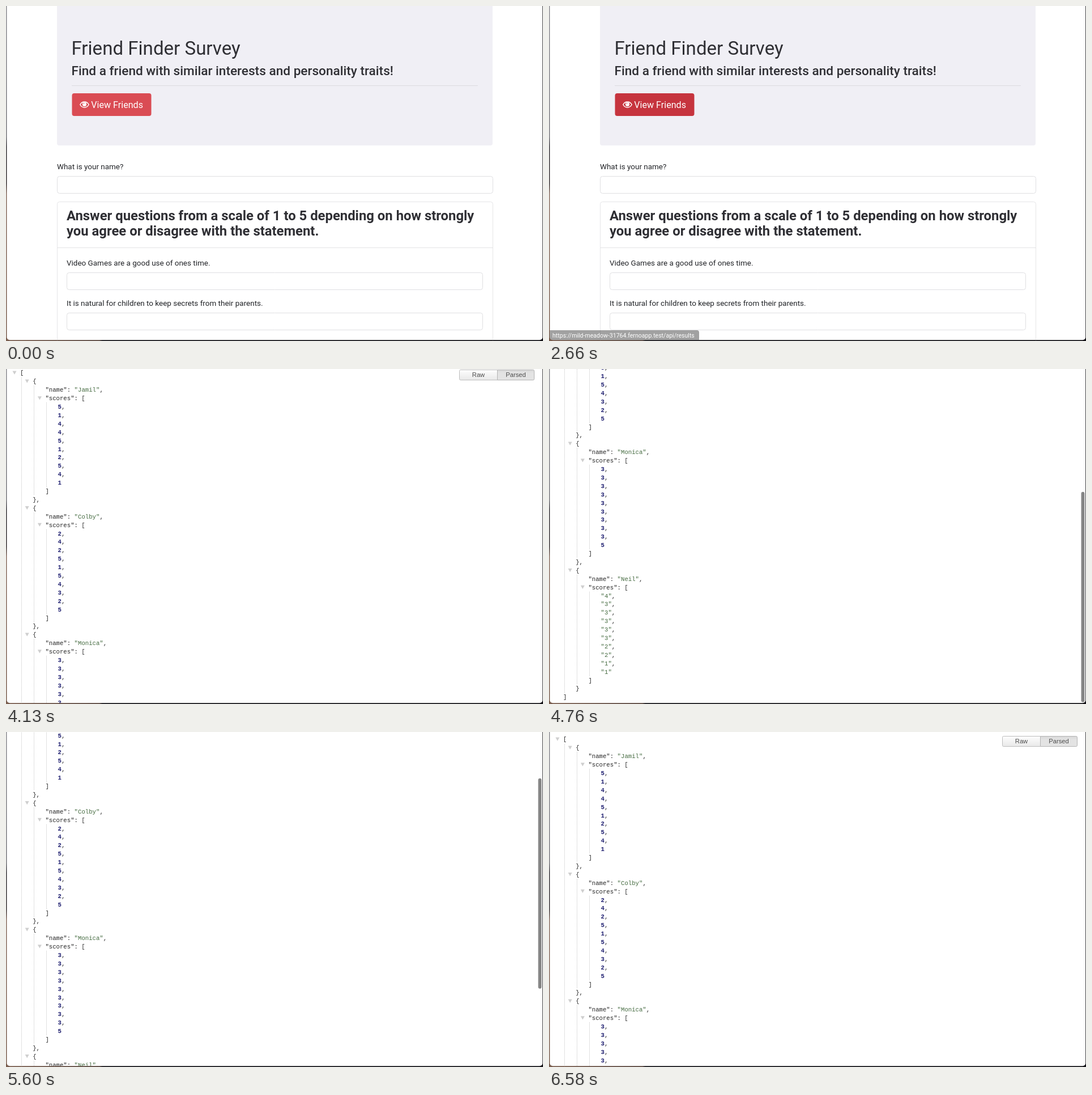
An HTML page with a canvas for the animation above (7210 ms loop, 948 by 591 pixels).

```html
<!DOCTYPE html>
<html lang="en">
<head>
<meta charset="utf-8">
<title>Survey and results</title>
<style>
  html, body { margin: 0; width: 100%; height: 100%; overflow: hidden; background: #fff; }
  canvas { display: block; width: 948px; height: 591px; }
</style>
</head>
<body>
<canvas id="stage" width="948" height="591"></canvas>
<script>
const ctx = document.getElementById('stage').getContext('2d');
const W = 948, H = 591, LOOP = 7210, TICK = 70;
const SANS = 'Roboto, "Open Sans", sans-serif';
const MONO = '"Liberation Mono", "Courier New", monospace';
const CHAR = 6.4, ROW = 14.9, INDENT = 22.2;
const MAX_SCROLL = 343;

const INK = '#2f2f34', LABEL = '#212327';
const KEY = '#262626', NUM = '#1f1f70', STR = '#456b40';
const URL_TEXT = 'https://mild-meadow-31764.fernoapp.test/api/results';
const people = [
  { name: 'Jamil', scores: '5144512541' },
  { name: 'Colby', scores: '2425154325' },
  { name: 'Monica', scores: '3333333335' },
  { name: 'Neil', scores: '4333332211', quoted: true }
];

// [time, scroll offset]
const scrollPath = [
  [4060, 0], [4130, 6], [4270, 76], [4410, 190], [4550, 288], [4690, 335],
  [4760, MAX_SCROLL], [5040, MAX_SCROLL], [5110, 336], [5250, 292],
  [5600, 126], [5740, 32], [5810, 7], [5950, 0]
];

const clamp = v => Math.max(0, Math.min(1, v));
const ramp = (t, from, to) => clamp((t - from) / (to - from));

function scrollAt(t) {
  const last = scrollPath.length - 1;
  if (t <= scrollPath[0][0] || t >= scrollPath[last][0]) return 0;
  const i = scrollPath.findIndex(p => p[0] > t);
  const [t0, a] = scrollPath[i - 1], [t1, b] = scrollPath[i];
  return Math.round(a + (b - a) * (t - t0) / (t1 - t0));
}

function text(str, x, y, font, color, align = 'left') {
  ctx.font = font;
  ctx.fillStyle = color;
  ctx.textAlign = align;
  ctx.fillText(str, x, y);
}

function box(x, y, w, h, r, fill, stroke) {
  ctx.beginPath();
  ctx.roundRect(x, y, w, h, r);
  if (fill) { ctx.fillStyle = fill; ctx.fill(); }
  if (stroke) { ctx.strokeStyle = stroke; ctx.lineWidth = 1; ctx.stroke(); }
}

function rule(x, y, w, color) {
  ctx.fillStyle = color;
  ctx.fillRect(x, y, w, 1);
}

function drawDesktop() {
  const side = ctx.createLinearGradient(0, 0, 0, H);
  side.addColorStop(0, '#8d8d92');
  side.addColorStop(0.39, '#77777c');
  side.addColorStop(0.42, '#3c3a3e');
  side.addColorStop(0.53, '#3c3638');
  side.addColorStop(0.56, '#8a6f62');
  side.addColorStop(1, '#7b5f50');
  ctx.fillStyle = '#17161a';
  ctx.fillRect(0, 0, W, H);
  ctx.fillStyle = side;
  ctx.fillRect(0, 0, 6, H);
  const floor = ctx.createLinearGradient(0, 0, 170, 0);
  floor.addColorStop(0, '#7b5f50');
  floor.addColorStop(0.97, '#54423a');
  floor.addColorStop(1, '#17161a');
  ctx.fillStyle = floor;
  ctx.fillRect(0, 584, 170, 7);
}

function drawEye(x, y) {
  ctx.fillStyle = ctx.strokeStyle = '#fff';
  ctx.lineWidth = 1.5;
  ctx.beginPath();
  ctx.moveTo(x - 7.7, y);
  ctx.bezierCurveTo(x - 4, y - 6.6, x + 4, y - 6.6, x + 7.7, y);
  ctx.bezierCurveTo(x + 4, y + 6.6, x - 4, y + 6.6, x - 7.7, y);
  ctx.closePath();
  ctx.stroke();
  ctx.beginPath();
  ctx.arc(x, y - 0.6, 3.6, 0, 7);
  ctx.fill();
  ctx.strokeStyle = '#da4c54';
  ctx.lineWidth = 0.9;
  ctx.beginPath();
  ctx.arc(x, y - 0.8, 1.9, Math.PI, Math.PI * 1.5);
  ctx.stroke();
}

function field(label, x, y, w) {
  text(label, x, y - 11.7, '13.47px ' + SANS, LABEL);
  box(x + 0.5, y + 0.5, w - 1, 30, 4, '#fff', '#dfdfe2');
}

function drawSurvey(t) {
  const hover = ramp(t, 2030, 2240);
  box(90, -8, 769, 254, 4, '#f0eff5');
  text('Friend Finder Survey', 115.5, 85.5, '33.1px ' + SANS, INK);
  text('Find a friend with similar interests and personality traits!', 115.5, 122,
    '500 22.6px ' + SANS, INK);
  rule(116, 140, 717, '#dcdbe0');

  const mix = (a, b) => Math.round(a + (b - a) * hover);
  box(116.5, 154, 140, 40, 4, `rgb(${mix(218, 198)},${mix(76, 52)},${mix(84, 62)})`);
  drawEye(138.5, 174);
  text('View Friends', 150.3, 179.7, '16.1px ' + SANS, '#fff');

  field('What is your name?', 90, 300, 770);
  box(90.5, 345.5, 769, 300, 4, null, '#e5e5e7');
  rule(91, 426, 768, '#e3e3e5');
  const head = 'bold 23.85px ' + SANS;
  text('Answer questions from a scale of 1 to 5 depending on how strongly', 107, 378, head, INK);
  text('you agree or disagree with the statement.', 107, 405, head, INK);
  field('Video Games are a good use of ones time.', 107, 470, 735);
  field('It is natural for children to keep secrets from their parents.', 107, 541, 735);
}

const rowX = level => 25 + level * INDENT;
const baseline = row => 16.4 + row * ROW;

// parts: alternating string and colour
function line(row, level, ...parts) {
  let x = rowX(level);
  for (let i = 0; i < parts.length; i += 2) {
    const weight = parts[i + 1] === NUM ? 'bold ' : '';
    text(parts[i], x, baseline(row), weight + '10.67px ' + MONO, parts[i + 1]);
    x += parts[i].length * CHAR;
  }
}

function arrow(row, level) {
  const x = 15 + level * INDENT, y = 12.6 + row * ROW;
  ctx.fillStyle = '#cfcfcf';
  ctx.beginPath();
  ctx.moveTo(x - 3.5, y - 3);
  ctx.lineTo(x + 3.5, y - 3);
  ctx.lineTo(x, y + 3.2);
  ctx.fill();
}

function guide(level, first, last) {
  const x = Math.round(27 + level * INDENT) + 0.5;
  const top = Math.round(5.6 + first * ROW);
  ctx.strokeStyle = '#c4c4c4';
  ctx.lineWidth = 1;
  ctx.setLineDash([1, 1]);
  ctx.beginPath();
  ctx.moveTo(x, top);
  ctx.lineTo(x, Math.round(5.6 + (last + 1) * ROW));
  ctx.stroke();
  ctx.setLineDash([]);
}

function drawPerson(p, row, isLast) {
  guide(1, row + 1, row + 13);
  guide(2, row + 3, row + 12);
  arrow(row, 1);
  arrow(row + 2, 2);
  line(row, 1, '{', KEY);
  line(row + 1, 2, '"name": ', KEY, `"${p.name}"`, STR, ',', KEY);
  line(row + 2, 2, '"scores": [', KEY);
  [...p.scores].forEach((s, i) => {
    const value = p.quoted ? [`"${s}"`, STR] : [s, NUM];
    line(row + 3 + i, 3, ...value, i < 9 ? ',' : '', KEY);
  });
  line(row + 13, 2, ']', KEY);
  line(row + 14, 1, isLast ? '}' : '},', KEY);
}

function drawToggle() {
  const face = ctx.createLinearGradient(0, 8, 0, 25);
  face.addColorStop(0, '#fdfdfd');
  face.addColorStop(1, '#e9e9e9');
  const pressed = ctx.createLinearGradient(0, 8, 0, 25);
  pressed.addColorStop(0, '#d8d8d8');
  pressed.addColorStop(0.3, '#e3e3e3');
  pressed.addColorStop(1, '#e3e3e3');
  box(800.5, 7.5, 67, 18, [2, 0, 0, 2], face, '#bdbdbd');
  box(867.5, 7.5, 65, 18, [0, 2, 2, 0], pressed, '#b4b4b4');
  const font = '11.2px "Liberation Sans", Arial, sans-serif';
  text('Raw', 834, 20.3, font, '#4c4c4c', 'center');
  text('Parsed', 900, 20.3, font, '#4c4c4c', 'center');
}

function drawResults(t) {
  const scroll = scrollAt(t);
  ctx.save();
  ctx.translate(0, -scroll);
  guide(0, 1, 60);
  arrow(0, 0);
  line(0, 0, '[', KEY);
  people.forEach((p, i) => drawPerson(p, 1 + i * 15, i === people.length - 1));
  line(61, 0, ']', KEY);
  drawToggle();
  ctx.restore();

  const bar = Math.min(ramp(t, 4130, 4270), 1 - ramp(t, 6370, 6580));
  if (bar > 0) {
    ctx.globalAlpha = bar;
    box(939.5, 3.5 + scroll * 0.622, 6, 371, 3, '#868686');
    ctx.globalAlpha = 1;
  }
}

function drawStatus(t) {
  const alpha = Math.min(ramp(t, 2520, 2730), 1 - ramp(t, 3290, 3500) * 1.25);
  if (alpha <= 0) return;
  ctx.globalAlpha = alpha * 0.8;
  box(0, 572, 265, 20, [0, 4, 0, 0], '#505050');
  ctx.globalAlpha = Math.min(1, alpha * 1.6);
  text(URL_TEXT, 6, 584.6, '10.55px ' + SANS, '#fff');
  ctx.globalAlpha = 1;
}

function draw(t) {
  drawDesktop();
  ctx.save();
  ctx.beginPath();
  ctx.roundRect(1.5, -10, 945.7, 599.3, 5);
  ctx.fillStyle = '#fff';
  ctx.fill();
  ctx.clip();
  if (t < 3010) drawSurvey(t);
  else drawResults(t);
  drawStatus(t);
  ctx.restore();
}

const start = performance.now();
function frame() {
  const t = (performance.now() - start) % LOOP;
  draw(Math.floor(t / TICK) * TICK);
  requestAnimationFrame(frame);
}
frame();
</script>
</body>
</html>
```
